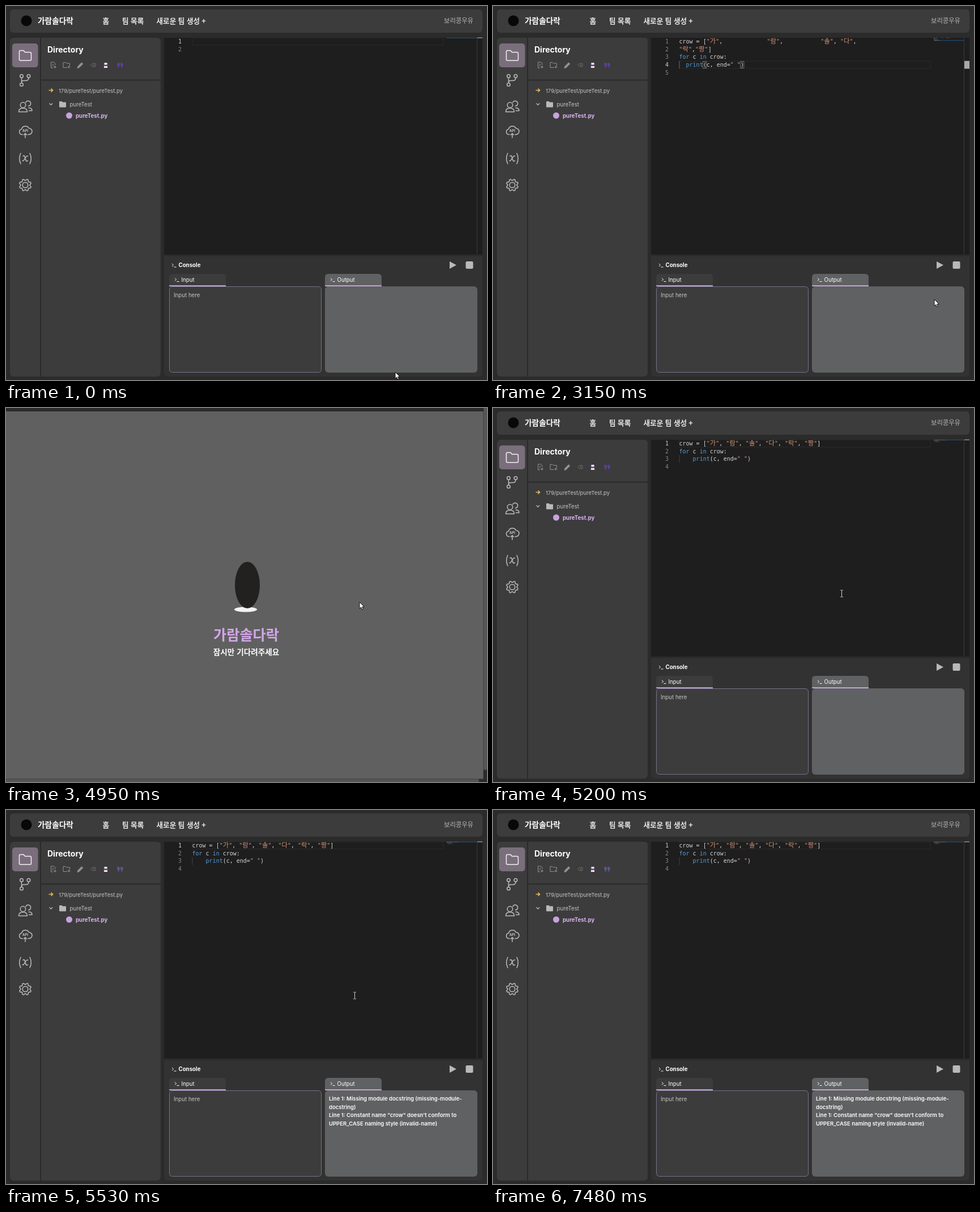
Animation of 849 by 659 pixels, one loop 8290 ms. Source, as an HTML page:

```html
<!DOCTYPE html>
<html lang="ko">
<head>
<meta charset="utf-8">
<style>
html, body { margin: 0; width: 100%; height: 100%; overflow: hidden; background: #2b2b2b; }
svg { display: block; }
text { font: 9.7px Inter, "Noto Sans CJK KR", sans-serif; fill: #fff; white-space: pre; }
.b { font-weight: 600; }
.small { font-size: 9.5px; }
.ko { font-family: "Noto Sans CJK KR", sans-serif; }
.nav { font-size: 12.6px; stroke: #fff; stroke-width: .3; }
.dim { fill: #c4c4c4; }
.icon { fill: none; stroke: #bdbdbd; stroke-width: 1.5; stroke-linecap: round; stroke-linejoin: round; }
.tool { fill: none; stroke: #929292; stroke-width: 1; stroke-linejoin: round; }
.code text { font: 10px "DejaVu Sans Mono", monospace; fill: #d4d4d4; }
.code .num { fill: #858585; text-anchor: end; }
.code .on { fill: #d0d0d0; }
.s { fill: #ce9178; }
.k { fill: #569cd6; }
.h { font: 11.4px "Noto Sans CJK KR", sans-serif; }
</style>
</head>
<body>
<svg width="849" height="659" viewBox="0 0 849 659">
  <rect width="849" height="659" fill="#2b2b2b"/>

  <!-- header -->
  <rect x="7" y="6" width="834" height="41" rx="6" fill="#3c3c3c"/>
  <circle cx="36" cy="26" r="9.5" fill="#080808"/>
  <text class="ko" x="56" y="30.5" style="font-size:13.7px;font-weight:700">가람솔다락</text>
  <text class="ko nav" x="170.5" y="30.5">홈</text>
  <text class="ko nav" x="205" y="30.5">팀 목록</text>
  <text class="ko nav" x="265.5" y="30.5">새로운 팀 생성 +</text>
  <text class="ko" x="773" y="30" style="font-size:11.3px;fill:#b9b9b9">보리콩우유</text>

  <!-- sidebar -->
  <path d="M60 56H14q-7 0-7 7V646q0 7 7 7H60Z" fill="#3c3c3c"/>
  <rect x="11" y="66" width="45.5" height="42" rx="5" fill="#7a6e7c"/>
  <g class="icon">
    <path stroke="#f2f2f2" d="M23.5 80.5q0-2 2-2h5.5l2.5 3h9q2 0 2 2v10.500q0 2-2 2h-17q-2 0-2-2Z"/>
    <circle cx="27.500" cy="123.500" r="2.800"/><circle cx="40" cy="123.500" r="2.800"/><circle cx="27.500" cy="138.500" r="2.800"/>
    <path d="M27.5 126.500v9M40 126.500q0 5-5 5h-4q-3.500 0-3.500 4"/>
    <circle cx="30" cy="174.500" r="4.700"/>
    <path d="M22.5 186.500q0-6.500 7.500-6.500t7.500 6.500ZM35 170a4.500 4.500 0 1 1 4.500 6.300M40 179.500q6 0 6 5h-5.500"/>
    <path d="M29 226.500h-1a4.800 4.800 0 0 1-.5-9.500a7 7 0 0 1 13-1.500a5.500 5.500 0 0 1 0 11h-1.500M34 232v-7M31.500 227l2.500-2.500 2.500 2.500"/>
    <path d="M26 259.500q-4.500 9 0 18.500M42 259.500q4.500 9 0 18.500"/>
    <path d="M30 264.500q2.500-2 3.500 2l1.500 5q1 3.500 3.500 1M38.500 264.500q-2-1-4 2.500l-2.500 4q-1.500 3-3 1.500"/>
    <path id="gear"/><circle cx="34" cy="315.500" r="4.800"/>
  </g>
  <text class="dim" x="34" y="222.300" text-anchor="middle" style="font-size:6px;font-weight:700">API</text>

  <!-- directory -->
  <path d="M62 56H267q6 0 6 6V646q0 7-7 7H62Z" fill="#3c3c3c"/>
  <path d="M62 130.500H273" stroke="#2b2b2b" stroke-width="2"/>
  <text x="73" y="82" style="font-size:14px;font-weight:700">Directory</text>
  <rect id="hover" x="164.500" y="93" width="23.500" height="22.500" rx="4" fill="#dcdcdc"/>
  <g class="tool">
    <path d="M83 109h-3.500V99h5l2.500 2.500V104M81.500 103h3M81.500 105.500h2M86.500 105v5M84 107.500h5"/>
    <path d="M108 108.500h-7V99.500h4l1.500 1.500h6v4M111 104.500v5.500M108.500 107.500h5"/>
    <path fill="#929292" d="M126 109.500l.8-3 6.700-6.700 2.200 2.200-6.700 6.700Z"/>
    <path stroke="#777" stroke-width=".8" d="M149.500 104l2.800-2.700h5.700v5.400h-5.700ZM153.300 102.700l2.600 2.600M155.900 102.700l-2.600 2.600"/>
  </g>
  <path fill="#4a3a5c" d="M171.500 100h8l1 1v8h-9Z"/>
  <path fill="#eee" d="M173.500 100h5v3.500h-5ZM173 105.500h6v3.500h-6Z"/>
  <path fill="#b44a78" d="M173 105h6v1.200h-6Z"/>
  <path id="lint" d="M196 102.500a2.400 2.400 0 0 1 4.800 0q.3 4-3 6.500l-.8-1 1-2.500q-2-.5-2-3ZM201.800 102.500a2.400 2.400 0 0 1 4.800 0q.3 4-3 6.500l-.8-1 1-2.500q-2-.5-2-3Z"/>
  <path d="M75.500 148.500h6M79.500 145.500l3 3-3 3" fill="none" stroke="#e5b85c" stroke-width="1.700"/>
  <text class="dim small" x="93" y="153">179/pureTest/pureTest.py</text>
  <path d="M76.500 171.500l2.800 2.800 2.800-2.800" fill="none" stroke="#c4c4c4" stroke-width="1.200"/>
  <path d="M94 169q0-1 1-1h3.500l1.500 1.500h5q1 0 1 1v7q0 1-1 1h-10q-1 0-1-1Z" fill="#b9b9b9"/>
  <text class="dim" x="112.500" y="176.500">pureTest</text>
  <circle cx="111.500" cy="193" r="5.500" fill="#c8a2dc"/>
  <text x="123" y="197" style="font-weight:700;fill:#dbb2f0">pureTest.py</text>

  <!-- editor -->
  <rect x="279" y="56" width="562" height="382" fill="#1e1e1e"/>
  <path d="M831.500 56V438" stroke="#3a3a3a"/>
  <g id="code" class="code"></g>

  <!-- console -->
  <path d="M279 441H841V646q0 7-7 7H286q-7 0-7-7Z" fill="#323232"/>
  <path d="M293 454l2.500 2.500-2.500 2.500M296.500 460h4M298 479.500l2.500 2.500-2.500 2.500" fill="none" stroke="#fff"/>
  <text x="304.500" y="459.500" style="font-weight:700">Console</text>
  <path d="M783 450l12 6.500-12 6.500Z" fill="#b9b9b9"/>
  <rect x="811.500" y="450" width="13" height="13" rx="2" fill="#b9b9b9"/>
  <path d="M288 494V478q0-6 6-6H382q6 0 6 6V494Z" fill="#3c3c3c"/>
  <path d="M563 494V478q0-6 6-6H657q6 0 6 6V494Z" fill="#606162"/>
  <rect x="288.500" y="494.500" width="268" height="151" rx="5" fill="#3c3c3c" stroke="#77738c"/>
  <rect x="563" y="494" width="269" height="152" rx="6" fill="#606162"/>
  <path d="M288 493.200H388M563 493.200H663" stroke="#cbb0e0" stroke-width="1.700"/>
  <path d="M298 479.500l2.500 2.500-2.500 2.500M301.500 485.500h4M573 479.500l2.500 2.500-2.500 2.500M576.500 485.500h4" fill="none" stroke="#fff"/>
  <text x="309.500" y="485.500" font-weight="500">Input</text>
  <text x="584.500" y="485.500" font-weight="500">Output</text>
  <text class="dim" x="296" y="513">Input here</text>
  <g id="output"></g>

  <!-- loading screen -->
  <g id="loading">
    <rect width="849" height="659" fill="#2b2b2b"/>
    <rect y="6" width="842.500" height="647.500" fill="#606060"/>
    <rect x="843" y="-4" width="6" height="642" rx="3" fill="#555"/>
    <rect x="-4" y="654" width="839" height="5" rx="2.500" fill="#555"/>
    <ellipse cx="423" cy="355" rx="20" ry="4.500" fill="#f4f2f4"/>
    <ellipse cx="426" cy="312" rx="22" ry="41" fill="#22211f"/>
    <text class="ko" x="424" y="408.500" text-anchor="middle" style="font-size:25.2px;font-weight:700;fill:#d2a6e8">가람솔다락</text>
    <text class="ko" x="424" y="434.500" text-anchor="middle" style="font-size:13.6px;font-weight:700">잠시만 기다려주세요</text>
  </g>

  <path id="arrow" d="M0 0V11.500L2.700 9 4.500 13 6.500 12.200 4.700 8.200H8.200Z" fill="#fff" stroke="#000" stroke-width=".9"/>
  <path id="beam" d="M-2.500-6H-.8L0-5.200.8-6H2.500M0-5.200V5.200M-2.500 6H-.8L0 5.200.8 6H2.500" fill="none" stroke="#d0d0d0"/>
</svg>
<script>
const $ = id => document.getElementById(id);
const LOOP = 8290, STEP = 82.3, TOP = 55.5, LINE = 13.75, LEFT = 328.5, CHAR = 6.02;

const EMPTY = ['', ''];
const PASTED = [
  'crow = ["가",' + ' '.repeat(13) + '"람",' + ' '.repeat(11) + '"솔", "다",',
  '"락","짱"]', 'for c in crow:', '  print(c, end=" ")', ''];
const TIDY = ['crow = ["가", "람", "솔", "다", "락", "짱"]', 'for c in crow:', '    print(c, end=" ")', ''];

// Mouse path: step, x, y
const MOUSE = [
  [0, 687, 645], [3, 420, 430], [5, 254, 260], [7, 400, 215], [9, 478, 189], [10, 478, 189],
  [14, 455, 100], [17, 444, 67], [33, 444, 67], [36, 690, 360], [38, 779, 517], [40, 790, 560],
  [42, 742, 576], [48, 742, 576], [51, 589, 375], [55, 184, 107], [56, 181, 105], [57, 181, 105],
  [60, 624, 342], [61, 618, 332], [63, 615.5, 327], [75, 615.5, 327], [80, 694, 576],
  [81, 694, 576], [84, 738, 589], [86, 738, 589], [91, 790, 672], [101, 790, 672]];

const between = (t, a, b) => t >= a && t < b;
const rect = (x, y, w, h, paint) => `<rect x="${x}" y="${y}" width="${w}" height="${h}" ${paint}/>`;

const paint = line => line
  .replace(/"[^"]*"|\b(?:for|in|print)\b/g, m => `<tspan class="${m[0] == '"' ? 's' : 'k'}">${m}</tspan>`)
  .replace(/[가-힣]/g, '<tspan class="h">$&</tspan>');

function minimap(lines, active) {
  let out = rect(778, 55.8 + active * 1.4, 53, 1.2, 'fill="#234a70"');
  lines.forEach((line, row) => {
    for (const m of line.matchAll(/\S+/g))
      out += rect(778 + m.index * .55, 56 + row * 1.4, m[0].length * .5, .9,
        `fill="${/"/.test(m[0]) ? '#ce9178' : '#9ab0c4'}" opacity=".45"`);
  });
  return out;
}

function editor(lines, active, focused, caret) {
  const y = TOP + active * LINE, typed = lines == PASTED;
  let out = rect(329, y + .5, 443, LINE - 1, 'fill="none" stroke="#2b2b2b"');
  lines.forEach((line, i) => {
    const base = TOP + i * LINE + 10.3;
    out += `<text class="num${i == active ? ' on' : ''}" x="310" y="${base}">${i + 1}</text>
      <text x="${LEFT}" y="${base}">${paint(line)}</text>`;
    if (line[0] == ' ') out += rect(328.5, TOP + i * LINE, 1, LINE, `fill="${i == active ? '#666' : '#404040'}"`);
  });
  if (typed && focused)
    for (const col of [7, 18])
      out += rect(LEFT + col * CHAR, y + 1, 6, LINE - 2, 'fill="none" stroke="#888" stroke-width=".8"');
  if (caret) out += rect(typed ? 444 : 328.5, y, 1.2, LINE, 'fill="#aeafad"');
  out += rect(832, y, 9, typed && focused ? LINE : 1.2, 'fill="#a8a8a8"');
  return out + minimap(lines, active);
}

function mouseAt(step) {
  const i = MOUSE.findIndex(p => p[0] > step);
  const [s0, x0, y0] = MOUSE[i - 1], [s1, x1, y1] = MOUSE[i];
  const k = (step - s0) / (s1 - s0);
  return [x0 + (x1 - x0) * k, y0 + (y1 - y0) * k];
}

const show = (id, on) => $(id).style.display = on ? '' : 'none';

let last = '';
function draw(t) {
  const lines = t < 2310 ? EMPTY : t < 5200 ? PASTED : TIDY;
  const active = lines == PASTED ? 3 : between(t, 740, 1640) ? 1 : 0;
  const focused = between(t, 740, 4550);
  const caret = [[740, 1240], [1640, 2150], [2310, 2810], [3230, 3730], [4230, 4550]]
    .some(([a, b]) => between(t, a, b));
  const key = [lines.length, active, focused, caret].join();
  if (key != last) $('code').innerHTML = editor(lines, active, focused, caret);
  last = key;

  const loading = between(t, 4790, 5200) || between(t, 5460, 5530);
  show('loading', loading);
  show('output', t >= 5530);
  $('lint').setAttribute('fill', t < 5530 ? '#5b3f9e' : '#5d568f');

  const [x, y] = mouseAt(Math.floor((t + 20) / STEP));
  const beam = !loading && between(x, 279, 831) && between(y, 56, 438);
  show('beam', beam);
  show('arrow', !beam);
  $(beam ? 'beam' : 'arrow').setAttribute('transform', `translate(${x} ${y})`);
  show('hover', between(x, 164, 188) && between(y, 93, 116));
}

$('gear').setAttribute('d', 'M' + Array.from({ length: 96 }, (_, i) => {
  const a = i / 96 * 2 * Math.PI, r = 9.4 - 1.2 * Math.tanh(2 * Math.cos(8 * a));
  return [34 + r * Math.cos(a), 315.5 + r * Math.sin(a)].map(v => v.toFixed(2));
}).join('L') + 'Z');

$('output').innerHTML = ['Line 1: Missing module docstring (missing-module-', 'docstring)',
  'Line 1: Constant name "crow" doesn\'t conform to', 'UPPER_CASE naming style (invalid-name)']
  .map((s, i) => `<text class="b small" x="570" y="${512.3 + i * 14.5}">${s}</text>`).join('');

const start = performance.now();
(function tick() {
  draw((performance.now() - start) % LOOP);
  requestAnimationFrame(tick);
})();
</script>
</body>
</html>
```
